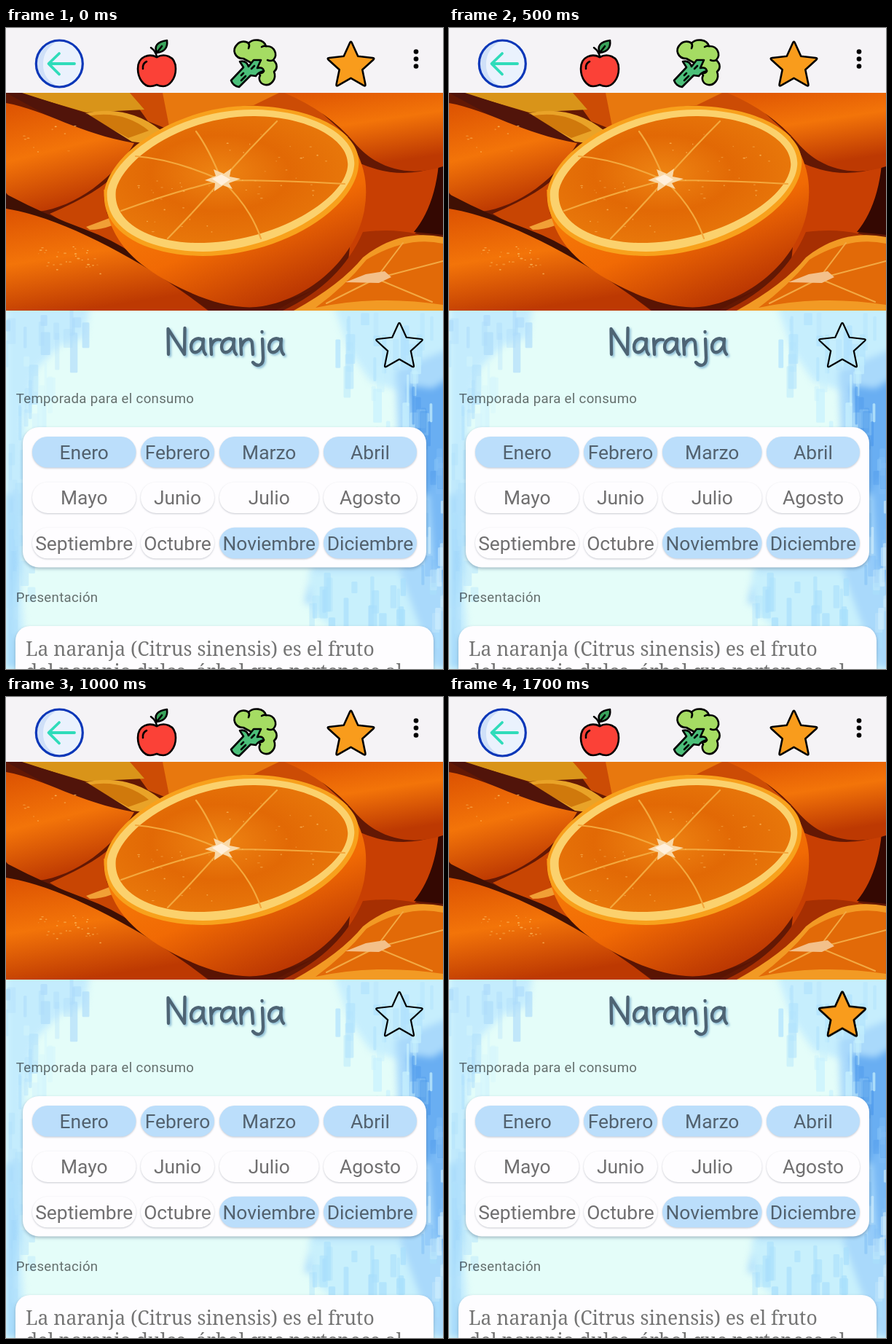
Write an HTML page that moves like this. It is 600 px wide and 880 px high and loops after 1.8 s.

```html
<!DOCTYPE html>
<html lang="es">
<head>
<meta charset="utf-8">
<title>Naranja</title>
<style>
  html, body { margin: 0; width: 100%; height: 100%; overflow: hidden; background: #e4fdf9; }
  svg { display: block; width: 100vw; height: 100vh; }
  .label { font: 18.6px Roboto, sans-serif; letter-spacing: .333px; fill: #000; fill-opacity: .56; }
  .month { font: 26.4px Roboto, sans-serif; text-anchor: middle; fill: #000; fill-opacity: .56; }
  .body { font: 26.5px "Noto Serif", serif; fill: #757575; }
  .ink { stroke: #000; stroke-width: 2.6; stroke-linejoin: round; stroke-linecap: round; }
  .line { fill: none; stroke-linecap: round; stroke-linejoin: round; }
  .card { fill: #fefdff; filter: drop-shadow(0 2px 2px rgba(50, 80, 110, .38)); }
  .pill { fill: #fefdff; filter: drop-shadow(0 1.5px 1px rgba(40, 50, 70, .25)); }
  .pill.on { fill: #bbdefb; }
  .soft { filter: blur(5px); }
  .fav { animation: fav 1800ms steps(1, end) infinite; }
  @keyframes fav {
    0% { opacity: 0; }
    66.667%, 100% { opacity: 1; }
  }
</style>
</head>
<body>
<svg viewBox="0 0 600 880" preserveAspectRatio="none">
  <defs>
    <path id="star"/>
    <path id="a" d="M17 5C11-1 1 4 1 14C1 24 11 24 17 12L18 3C17 12 17 20 21 24"/>
    <clipPath id="photo"><path d="M0 89H600V388H0Z"/></clipPath>
    <clipPath id="paper"><path d="M0 388H600V880H0Z"/></clipPath>
    <linearGradient id="rind" x1="0" y1="0" x2=".7" y2="1">
      <stop offset="0" stop-color="#fb8a0b"/>
      <stop offset=".6" stop-color="#f16a04"/>
      <stop offset="1" stop-color="#b63202"/>
    </linearGradient>
    <linearGradient id="skin" x1="0" y1="0" x2=".3" y2="1">
      <stop offset="0" stop-color="#dc5202"/>
      <stop offset=".5" stop-color="#f37409"/>
      <stop offset="1" stop-color="#bd3902"/>
    </linearGradient>
    <radialGradient id="flesh" cx=".45" cy=".45" r=".6">
      <stop offset="0" stop-color="#ee8413"/>
      <stop offset=".5" stop-color="#e26905"/>
      <stop offset="1" stop-color="#e9790b"/>
    </radialGradient>
  </defs>

  <!-- watercolour paper -->
  <g clip-path="url(#paper)">
    <path fill="#e4fdf9" d="M0 388H600V880H0Z"/>
    <g class="soft">
      <path fill="#c4ecfd" d="M0 380H115L108 425L75 435L40 470L24 540L30 640L20 760L28 880H0Z"/>
      <path fill="#a4d9fb" d="M0 640H14L20 740L10 800L16 880H0Z"/>
      <path fill="#c6eefd" d="M450 380H610V540L545 500L500 485L470 440Z"/>
      <path fill="#a9d9fb" d="M535 470L610 440V880H575L540 800L410 790L420 740H545Z"/>
      <path fill="#c8f0fc" d="M415 745H540L590 880H510L420 800Z"/>
      <path fill="#69aef2" d="M552 490L585 495L610 480V640H570Z"/>
      <path fill="#79b9f5" d="M580 630L610 600V770L588 740Z"/>
    </g>
    <g id="wash"></g>
  </g>

  <!-- photo -->
  <g clip-path="url(#photo)">
    <path fill="#631804" d="M0 89H600V388H0Z"/>
    <path fill="#cc4c05" d="M165 86H400L470 150L250 150L195 128Z"/>
    <path fill="#e8780e" d="M215 89H375L340 106Q270 110 225 140Z"/>
    <path fill="#d99419" d="M18 89H170L190 112L110 116Z"/>
    <path fill="#e9a328" d="M105 118Q165 103 212 140L190 158L155 154Z"/>
    <path fill="#d0790c" d="M112 121Q160 112 196 141L168 151Z"/>
    <path fill="#51140a" d="M0 89H22L112 118L176 158L130 160Z"/>
    <path fill="url(#skin)" d="M0 103C55 113 100 145 176 158C150 205 95 246 45 252Q16 248 0 226Z"/>
    <path fill="#c84503" d="M60 255Q130 225 150 200Q120 250 160 290L195 335Z"/>
    <path fill="#f1a036" d="M110 273L142 261L146 271Q130 277 115 277Z"/>
    <path fill="#3f1004" d="M0 228Q55 257 110 277Q185 305 222 356L100 290L0 253Z"/>
    <path fill="url(#skin)" d="M0 248C75 259 195 322 280 390H0Z"/>
    <path fill="#c83f03" d="M484 185Q540 210 594 190Q592 260 560 283L470 320Z"/>
    <path fill="#340802" d="M594 188H600V284L560 280Q588 246 594 188Z"/>
    <path fill="url(#skin)" d="M375 86H600V190C555 205 510 195 478 157Q440 112 375 86Z"/>
    <path fill="#a62f02" d="M380 388Q460 350 490 280Q555 272 600 296V388Z"/>
    <path fill="#f29a24" d="M395 388Q460 352 490 315Q540 275 600 287V388Z"/>
    <path fill="#e26a08" d="M425 384Q465 355 495 318Q550 285 600 296V380Q510 366 425 384Z"/>
    <path class="line" stroke="#f3a943" stroke-width="2" d="M508 344L600 320M508 344L585 376M508 344L545 295M508 344L440 378"/>
    <path fill="#f3c08a" d="M466 349L494 338L520 334L529 342L512 350Z"/>
    <path fill="#581303" opacity=".7" d="M280 388L225 350L300 375Q370 390 440 350L370 388Z"/>

    <path fill="url(#rind)" d="M134 222C138 285 168 318 224 349C270 374 316 388 352 382C420 370 480 315 492 250Q500 205 480 168Z"/>
    <path fill="#f8a11c" d="M135 224C146 165 245 103 345 107C432 111 490 148 484 190C478 250 375 313 270 313C190 312 130 280 135 224Z"/>
    <path fill="#fbd16d" d="M139 223C150 170 245 109 345 112C427 115 483 150 478 190C472 244 370 306 270 307C194 306 134 276 139 223Z"/>
    <path fill="url(#flesh)" d="M151 222C163 175 250 120 342 121C418 122 474 155 469 191C463 238 366 293 272 295C202 297 145 269 151 222Z"/>
    <path class="line" stroke="#f4a83d" stroke-width="2.2" d="M296 209Q278 165 261 142M296 209Q335 165 372 128M296 209Q380 209 465 214M296 209Q335 245 350 289M296 209Q230 225 158 251M296 209Q230 180 178 176M296 209Q260 250 222 289"/>
    <path fill="#f9d8a6" d="M273 209L288 203L285 194L299 200L309 193L307 204L322 207L306 213L311 221L298 216L286 224L287 213Z"/>
    <path fill="#fff0dc" d="M283 207L296 201L308 208L296 216Z"/>
    <g id="glints" fill="#ffc66b"></g>
  </g>

  <!-- top bar -->
  <path fill="#f5f3f6" d="M0 0H600V89H0Z"/>
  <circle cx="73.3" cy="49" r="32" fill="#eaf2fd"/>
  <path fill="#cfe0f8" d="M73 17A32 32 0 0 0 73 81Q50 71 51 49Q51 28 73 17Z"/>
  <circle cx="73.3" cy="49" r="32" fill="none" stroke="#0b37b8" stroke-width="3.2"/>
  <path class="line" stroke="#2fdcba" stroke-width="3.8" d="M94 49H59M73 35L58.500 49L73 63.500"/>

  <g class="ink">
    <path fill="#fb4137" d="M207 40C216 35 233 37 233 56C233 70 224 80 216 80Q211 80 207 78Q202 80 198 80C189 80 181 69 181 56C181 38 197 35 207 40Z"/>
    <path fill="none" d="M207 40Q206 32 199 27M188 56Q187 49 193 46"/>
    <path fill="#39a35b" d="M207 34Q201 20 221 17Q223 32 207 34ZM207 34L214 25"/>
  </g>

  <g class="ink" fill="#a5dc63">
    <path d="M326 42C314 42 310 30 317 23C322 17 330 18 333 21C339 14 354 15 357 25C368 24 374 36 367 44C374 50 372 57 368 60C372 70 364 79 356 78C349 77 346 70 349 65L337 48Z"/>
    <path fill="#4bbf79" d="M309 72L326 54L321 46Q330 44 333 53L340 44H350L345 55Q353 53 354 59Q347 60 343 66L336 65L320 81Q312 80 309 72Z"/>
    <path fill="none" d="M333 21Q335 24 333 28M357 25Q354 24 351 26M367 44Q363 46 359 44M323 65L326 62M323 72L329 66M337 56L341 52M348 62Q353 62 354 59"/>
  </g>

  <use href="#star" class="ink" x="473.500" y="52.200" fill="#f99c1c"/>
  <circle cx="563" cy="32.500" r="3.300"/>
  <circle cx="563" cy="42.500" r="3.300"/>
  <circle cx="563" cy="52.500" r="3.300"/>

  <!-- heading -->
  <g class="line" stroke="#4e6474" stroke-width="4.300" style="filter:drop-shadow(2px 2px 1.500px rgba(90,150,190,.65))">
    <title>Naranja</title>
    <path d="M223 448L222.500 413L245 448L245.500 412"/>
    <use href="#a" x="253" y="424"/>
    <path d="M281 427L282 448M282 436Q285 426 294 428"/>
    <use href="#a" x="295" y="424"/>
    <path d="M322 427L323 448M323 437C327 425 338 424 338 434L339 448"/>
    <path d="M352 427L353 453C353 465 344 465 339 459M351.500 417V417.500"/>
    <use href="#a" x="360" y="424"/>
  </g>
  <use href="#star" class="ink" x="540" y="438.200" fill="none" style="stroke-width:2.2"/>
  <use href="#star" class="ink fav" x="540" y="438.200" fill="#f99c1c"/>

  <text class="label" x="13.700" y="515">Temporada para el consumo</text>
  <rect class="card" x="23" y="548" width="554" height="192.500" rx="22"/>
  <g id="months"></g>
  <text class="label" x="13.700" y="788">Presentación</text>
  <rect class="card" x="13" y="821" width="574" height="90" rx="20"/>
  <text class="body" x="27" y="862">La naranja (Citrus sinensis) es el fruto</text>
  <text class="body" x="27" y="892.500">del naranjo dulce, árbol que pertenece al</text>
</svg>

<script>
  const $ = id => document.getElementById(id);
  const add = (parent, tag, attrs, text = '') => {
    const el = document.createElementNS('http://www.w3.org/2000/svg', tag);
    for (const k in attrs) el.setAttribute(k, attrs[k]);
    el.textContent = text;
    parent.append(el);
  };

  let seed = 11;
  const rnd = (min, max) => {
    seed = (seed * 16807) % 2147483647;
    return min + (max - min) * seed / 2147483647;
  };

  // five-pointed star with softened tips
  const polar = (r, i) => [r * Math.sin(i * Math.PI / 5), -r * Math.cos(i * Math.PI / 5)];
  const mix = (p, q, t) => p.map((v, k) => (v + (q[k] - v) * t).toFixed(2));
  let star = '';
  for (let i = 0; i < 10; i += 2) {
    const tip = polar(35, i), prev = polar(16.6, i - 1), next = polar(16.6, i + 1);
    star += `${i ? 'L' : 'M'}${mix(tip, prev, .15)}Q${tip} ${mix(tip, next, .15)}L${next}`;
  }
  $('star').setAttribute('d', star + 'Z');

  // month chips
  const names = ['Enero', 'Febrero', 'Marzo', 'Abril', 'Mayo', 'Junio', 'Julio', 'Agosto',
    'Septiembre', 'Octubre', 'Noviembre', 'Diciembre'];
  const cols = [[36, 142.5], [185, 101], [293, 136.5], [436, 128]];
  names.forEach((name, i) => {
    const [x, width] = cols[i % 4], y = 561 + 62.4 * Math.floor(i / 4);
    const on = i < 4 || i > 9;
    add($('months'), 'rect', { class: on ? 'pill on' : 'pill', x, y, width, height: 42.5, rx: 21 });
    add($('months'), 'text', { class: 'month', x: x + width / 2, y: y + 31 }, name);
  });

  // brush strokes: x range, y range, colour, count
  const washes = [
    [0, 110, 385, 420, '#aedcfb', 14],
    [0, 34, 420, 850, '#b3e2fc', 30],
    [24, 60, 450, 530, '#d4f5fc', 10],
    [450, 590, 385, 470, '#b0e2fd', 20],
    [500, 590, 450, 550, '#c8f1fd', 14],
    [545, 595, 490, 620, '#4f9aeb', 12],
    [560, 600, 560, 760, '#84c1f7', 14],
    [410, 595, 740, 810, '#a9dffc', 24],
    [575, 600, 640, 850, '#d2effd', 10]
  ];
  for (const [x0, x1, y0, y1, fill, n] of washes)
    for (let i = 0; i < n; i++)
      add($('wash'), 'rect', {
        x: rnd(x0, x1), y: rnd(y0, y1), width: rnd(3, 13), height: rnd(14, 55),
        rx: 1.5, fill, opacity: rnd(.3, .75)
      });

  // wet highlights: centre, spread, count
  for (const [cx, cy, w, h, n] of [[85, 318, 45, 20, 34], [235, 245, 60, 35, 24], [370, 190, 70, 45, 26], [60, 150, 45, 25, 10]])
    for (let i = 0; i < n; i++)
      add($('glints'), 'ellipse', {
        cx: cx + rnd(-w, w), cy: cy + rnd(-h, h), rx: rnd(.6, 2.2), ry: rnd(.5, 1), opacity: rnd(.3, .8)
      });
</script>
</body>
</html>
```
